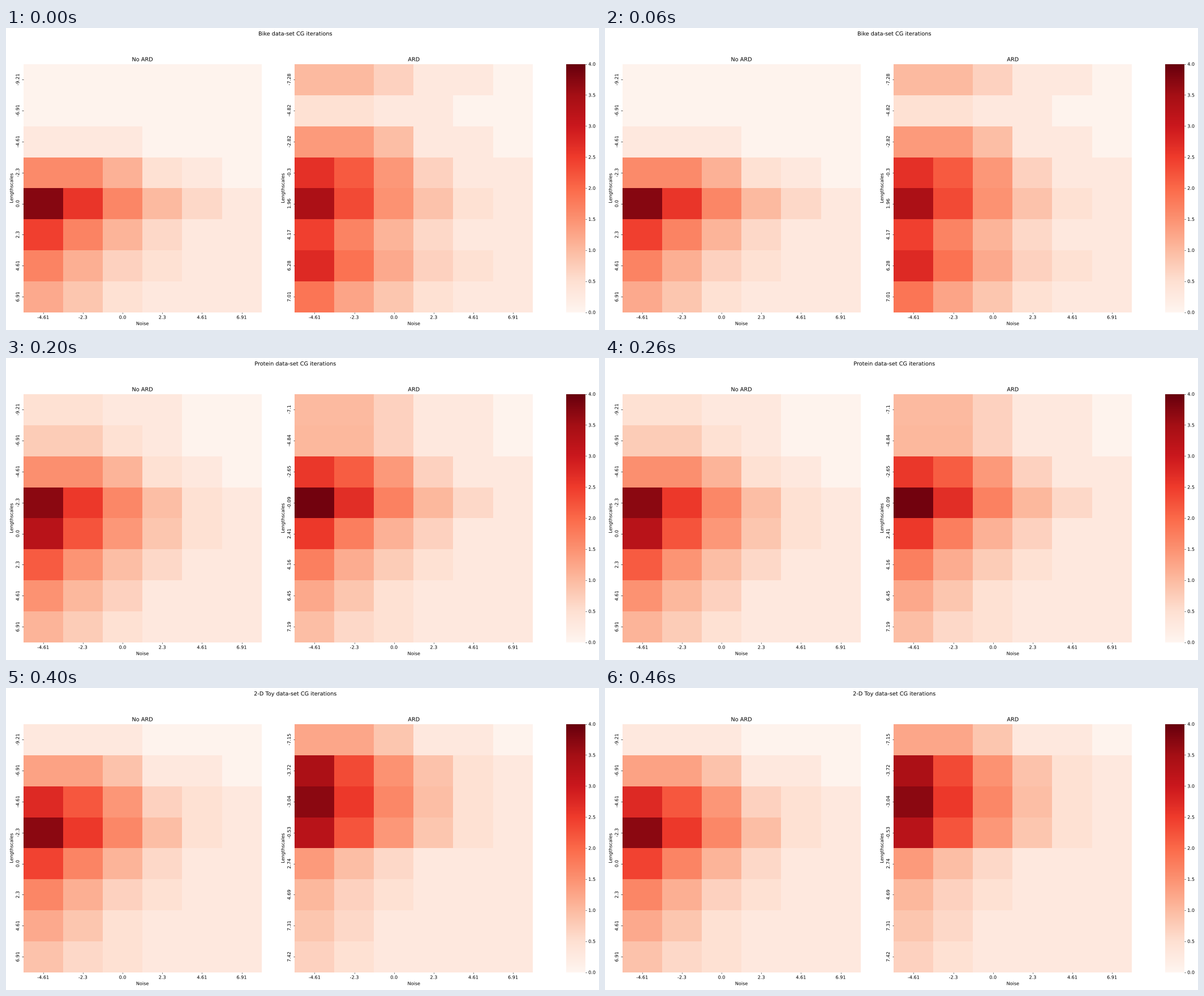
A matplotlib script for the animation above (0.5 s loop, 1048x534 px).

```python
import matplotlib.pyplot as plt
import numpy as np
from matplotlib.animation import FuncAnimation
from matplotlib.patheffects import Normal

W, H, DPI = 1048, 534, 64
SCALE = 0.911  # size of all type and ticks against the library defaults
ROWS, COLS = 8, 6
STEP = np.log(10)  # both grids advance by one decade per cell

plt.rcParams.update({
    "font.family": "DejaVu Sans",
    "font.size": 10 * SCALE,
    "axes.titlesize": 12 * SCALE,
    "axes.titlepad": 6 * SCALE,
    "axes.labelpad": 4 * SCALE,
    "text.hinting": "none",
    "path.effects": [Normal()],  # text as outlines, placed between pixels
})


def decay(c):
    """Share of the log count left after c steps of noise."""
    return np.exp(-0.34 * c - 0.035 * c ** 2)


def panel(rise):
    """Log10 iteration counts, grown from the first column's rise to its peak.

    Past the listed rise the first column relaxes geometrically. Each row then
    decays with noise. Rows above the peak start to decay late, and need only
    a single iteration once the noise is beyond their reach.
    """
    heights = list(rise)
    while len(heights) < ROWS:
        heights.append(0.2 + 0.6 * heights[-1])
    peak = np.argmax(heights)
    c = np.arange(COLS)
    grid = []
    for r, h in enumerate(heights):
        lag, reach = 0, COLS
        if r < peak:
            lag = np.clip((3.4 - h) / 1.7, 0, 1)
            reach = 4.1 * h ** 0.27
        late = np.where(c < 3, np.maximum(c - lag, 0), c)
        counts = np.maximum(np.round(10 ** (h * decay(late))), 2)
        grid.append(np.where(c < reach, np.log10(counts), 0.06))
    return np.array(grid)


def study(name, scales, plain, ard):
    return name, scales, panel(plain), panel(ard)


bike = study("Bike", [-7.28, -4.82, -2.82, -0.3, 1.96, 4.17, 6.28, 7.01],
             plain=[0, 0, 0.3, 1.6, 3.75],
             ard=[1, 0.48, 1.4, 2.65, 3.4, 2.45, 2.75])
elevator = study("Elevator",
                 [-7.32, -4.92, -2.97, -0.35, 1.87, 4.42, 6.49, 6.9],
                 plain=[0, 0, 0.48, 1.85, 3.5],
                 ard=[1.15, 0.3, 0.85, 3.7, 3])
protein = study("Protein",
                [-7.1, -4.84, -2.65, -0.09, 2.41, 4.16, 6.45, 7.19],
                plain=[0.48, 0.78, 1.55, 3.7, 3.25],
                ard=[1, 1.05, 2.55, 3.9])
road = study("Road", [-7.24, -5.51, -2.62, -0.25, 1.38, 4.21, 6.5, 6.52],
             plain=[1.6, 2.35, 3.4, 3.8],
             ard=[2.05, 1.85, 3.9, 3.25])
toy = study("2-D Toy", [-7.15, -3.72, -3.04, -0.53, 2.74, 4.69, 7.31, 7.42],
            plain=[0.3, 1.3, 2.75, 3.7],
            ard=[1.25, 3.4, 3.7, 3.25, 1.4])

studies = [bike, elevator, protein, road, toy]

fig = plt.figure(figsize=(W / DPI, H / DPI), dpi=DPI, facecolor="white")


def add_axes(left, right, top=63.6, bottom=502.6):
    ax = fig.add_axes([left / W, 1 - bottom / H,
                       (right - left) / W, (bottom - top) / H])
    ax.spines[:].set_visible(False)
    ax.tick_params(length=3.5 * SCALE, width=0.8 * SCALE, pad=3.5 * SCALE)
    return ax


def decades(first, n):
    return [str(round(STEP * (first + i), 2)) for i in range(n)]


def label_rows(ax, labels):
    ax.set_yticks(range(ROWS), labels, rotation=90, va="center")


def heatmap(left, right, title):
    ax = add_axes(left, right)
    image = ax.imshow(np.zeros((ROWS, COLS)), cmap="Reds", vmin=0, vmax=4,
                      aspect="auto", interpolation="nearest")
    ax.set_title(title)
    ax.set_xlabel("Noise")
    ax.set_ylabel("Lengthscales")
    ax.set_xticks(range(COLS), decades(-2, COLS))
    label_rows(ax, decades(-4, ROWS))
    return ax, image


plain_ax, plain_map = heatmap(30.7, 451.6, "No ARD")
# The plain grid skips one decade, from -3 to -2 through to 0 it is regular.
ard_ax, ard_map = heatmap(510.4, 931.2, "ARD")

bar = add_axes(990, 1023.5)
bar.imshow(np.linspace(0, 4, 256)[:, None], cmap="Reds", origin="lower",
           extent=(0, 1, 0, 4), aspect="auto", interpolation="nearest")
bar.set_xticks([])
bar.yaxis.tick_right()
bar.set_yticks(np.arange(0, 4.1, 0.5))

heading = fig.text(511.5 / W, 1 - 13.3 / H, "", ha="center", va="baseline",
                   size=12 * SCALE)


def update(i):
    name, scales, plain, ard = studies[i]
    heading.set_text(f"{name} data-set CG iterations")
    plain_map.set_data(plain)
    ard_map.set_data(ard)
    label_rows(ard_ax, [str(s) for s in scales])
    return heading, plain_map, ard_map


anim = FuncAnimation(fig, update, frames=len(studies), interval=100,
                     repeat=True, repeat_delay=0, blit=False)
plt.show()
```
